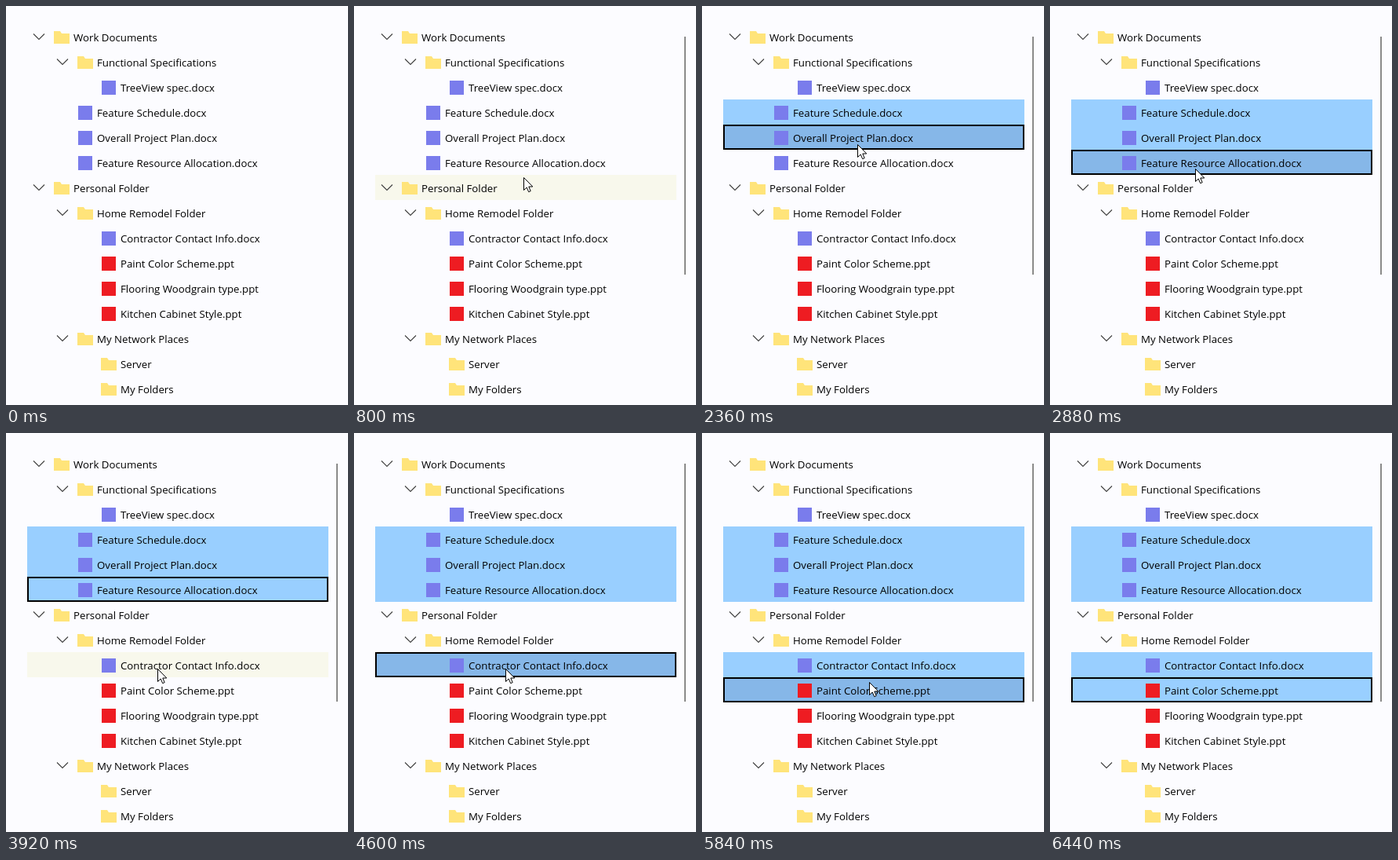
Recreate the animation shown at these times as an HTML page. Size 436 by 508 pixels, loop 6840 ms.

```html
<!DOCTYPE html>
<html lang="en">
<head>
<meta charset="utf-8">
<title>Tree multi-select</title>
<style>
  html, body { margin: 0; width: 100%; height: 100%; overflow: hidden; background: #fcfcff; }
  svg { display: block; width: 436px; height: 508px; }
  text { font: 13.25px "Open Sans", "Noto Sans", sans-serif; fill: #000; }
</style>
</head>
<body>
<svg id="stage" viewBox="0 0 436 508"></svg>
<script>
const LOOP = 6840, STEP = 40;
const ROW_TOP = 23, ROW_H = 32, ROW_X = 27, ROW_W = 384;
const COLORS = { selected: '#99cfff', hover: '#f8f8ec', both: '#86b7e8', doc: '#7a7cec', slides: '#ee1c22', folder: '#ffe47a' };

// [depth, kind, label]
const ROWS = [
  [0, 'open', 'Work Documents'],
  [1, 'open', 'Functional Specifications'],
  [2, 'doc', 'TreeView spec.docx'],
  [1, 'doc', 'Feature Schedule.docx'],
  [1, 'doc', 'Overall Project Plan.docx'],
  [1, 'doc', 'Feature Resource Allocation.docx'],
  [0, 'open', 'Personal Folder'],
  [1, 'open', 'Home Remodel Folder'],
  [2, 'doc', 'Contractor Contact Info.docx'],
  [2, 'slides', 'Paint Color Scheme.ppt'],
  [2, 'slides', 'Flooring Woodgrain type.ppt'],
  [2, 'slides', 'Kitchen Cabinet Style.ppt'],
  [1, 'open', 'My Network Places'],
  [2, 'folder', 'Server'],
  [2, 'folder', 'My Folders']
];

// [time, row]
const CLICKS = [[1520, 3], [2360, 4], [2880, 5], [4160, 8], [4840, 9]];

// Pointer moves: [start, end, x, y] at the end of each move
const ENTER = { x: 236, y: 400, time: 40 };
const EXIT_TIME = 6440;
const MOVES = [
  [40, 280, 222, 290],
  [640, 1200, 210, 144],
  [1920, 2160, 198, 176],
  [2640, 2840, 185, 207],
  [3480, 3920, 193, 300],
  [4600, 4760, 200, 322],
  [4880, 5240, 338, 56],
  [5320, 5840, 213, 317],
  [6080, 6440, 236, 512]
];

const stage = document.getElementById('stage');

function add(tag, attrs, text) {
  const node = document.createElementNS('http://www.w3.org/2000/svg', tag);
  for (const key in attrs) node.setAttribute(key, attrs[key]);
  if (text) node.textContent = text;
  return stage.appendChild(node);
}

const rowTop = i => ROW_TOP + i * ROW_H;

const backs = ROWS.map((_, i) =>
  add('rect', { x: ROW_X, y: rowTop(i), width: ROW_W, height: ROW_H, fill: 'none' }));

ROWS.forEach(([depth, kind, label], i) => {
  const x = 61 + depth * 30, mid = 40 + i * ROW_H;
  if (kind === 'open') {
    add('path', { d: `M${x - 26} ${mid - 4.5}l7 7l7 -7`, fill: 'none', stroke: '#404040', 'stroke-width': 1.1 });
  }
  if (kind === 'open' || kind === 'folder') {
    add('path', { d: `M${x} ${mid - 8}h8l2 3h10v13h-20z`, fill: COLORS.folder });
  } else {
    add('rect', { x: x + 1, y: mid - 9, width: 18, height: 18, fill: COLORS[kind] });
  }
  add('text', { x: x + 25, y: mid + 5 }, label);
});

const focusBox = add('rect', {
  x: ROW_X + 1, width: ROW_W - 2, height: ROW_H - 2, fill: 'none', stroke: '#000', 'stroke-width': 2
});
const scrollbar = add('rect', { x: 421, y: 39, width: 2, height: 303, fill: '#8a8a8a' });
const cursor = add('path', {
  d: 'M.5 .5V16.5L4.2 13L6.7 18.7L9.2 17.6L6.8 12H11.8Z',
  fill: '#fff', stroke: '#000', 'stroke-width': 1
});

const show = (node, on) => node.setAttribute('visibility', on ? 'visible' : 'hidden');

function pointerAt(t) {
  let { x, y } = ENTER;
  for (const [start, end, toX, toY] of MOVES) {
    if (t <= start) break;
    const left = 1 - Math.min(1, (t - start) / (end - start));
    const p = 1 - left * left;
    x += (toX - x) * p;
    y += (toY - y) * p;
  }
  return { x, y };
}

function render(time) {
  const t = Math.floor(time % LOOP / STEP) * STEP;
  const inside = t >= ENTER.time && t < EXIT_TIME;
  const { x, y } = pointerAt(t);
  // The row highlight trails the pointer by one step.
  const hovered = inside ? Math.floor((pointerAt(t - STEP).y - ROW_TOP) / ROW_H) : -1;
  const picked = CLICKS.filter(([at]) => t >= at).map(([, row]) => row);

  backs.forEach((back, i) => {
    const selected = picked.includes(i), hover = hovered === i;
    back.setAttribute('fill', selected ? (hover ? COLORS.both : COLORS.selected) : hover ? COLORS.hover : 'none');
  });

  show(focusBox, picked.length);
  if (picked.length) focusBox.setAttribute('y', rowTop(picked[picked.length - 1]) + 1);
  show(scrollbar, t >= ENTER.time);
  show(cursor, inside);
  cursor.setAttribute('transform', `translate(${Math.round(x)} ${Math.round(y)})`);
}

const began = performance.now();
function tick() {
  render(performance.now() - began);
  requestAnimationFrame(tick);
}
tick();
</script>
</body>
</html>
```
